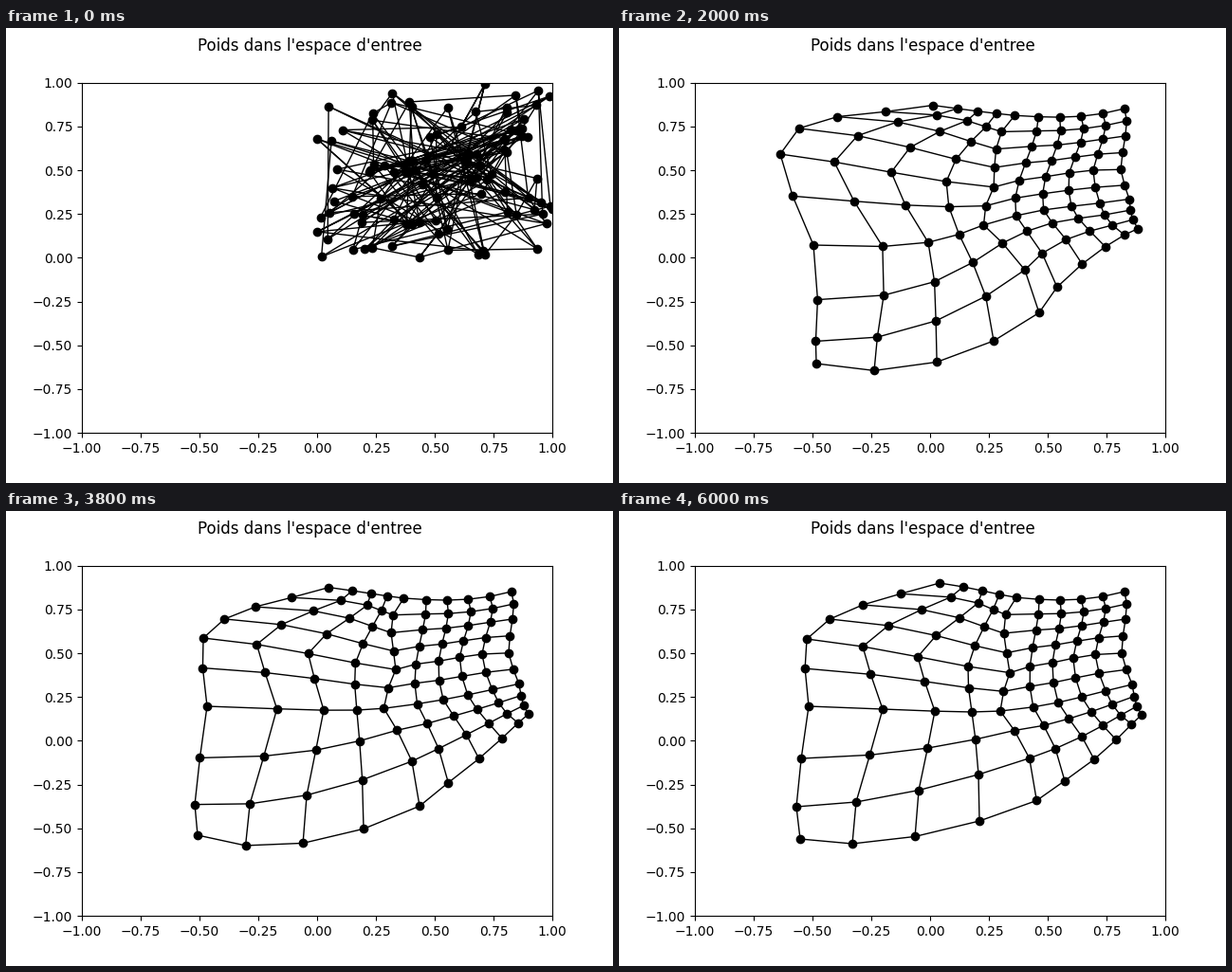
Recreate the animation shown at these times as a matplotlib script. Size 640 by 480 pixels, loop 6.2 s.

```python
import numpy as np
import matplotlib.pyplot as plt
from matplotlib.animation import FuncAnimation

N, FRAMES, STEP_MS = 10, 31, 200


def weights(nodes):
    """Local cubic interpolation from the given nodes to all N indices."""
    w = np.zeros((N, len(nodes)))
    for i in range(N):
        near = sorted(range(len(nodes)), key=lambda k: abs(nodes[k] - i - 0.1))[:4]
        for k in near:
            w[i, k] = np.prod([(i - nodes[j]) / (nodes[k] - nodes[j])
                               for j in near if j != k])
    return w


# Settled map: a few control nodes in pixels, y pointing down.
rows, cols = weights([0, 2, 4, 6, 8, 9]), weights([0, 1, 3, 6, 9])
settled = np.einsum("ri,ijk,cj->krc", rows, np.array([
    [(338, 76), (363, 80), (401, 88), (465, 94), (533, 85)],
    [(257, 99), (319, 104), (385, 122), (464, 124), (534, 114)],
    [(198, 135), (257, 143), (368, 164), (457, 160), (530, 150)],
    [(200, 206), (278, 209), (372, 212), (463, 202), (541, 183)],
    [(187, 312), (250, 307), (379, 278), (488, 238), (546, 206)],
    [(191, 346), (246, 351), (380, 327), (501, 262), (551, 215)]]), cols)

# The loose left and lower part is pulled at these (row, column) spots.
SPOTS = np.array([(1, 0), (4, 0), (6, 0), (9, 0), (6, 2), (9, 2), (8, 5)])
GRID = np.stack(np.indices((N, N)), -1).reshape(-1, 2)


def kernel(a, b, width=2.2):
    d2 = ((a[:, None] - b[None]) ** 2).sum(-1)
    return np.exp(-d2 / (2 * width ** 2))


SPREAD = kernel(GRID, SPOTS) @ np.linalg.inv(kernel(SPOTS, SPOTS))


def pulled(*pulls):
    return settled + (SPREAD @ np.array(pulls)).T.reshape(2, N, N)


KEYS = [
    (4, pulled((22, -10), (-17, 7), (-16, 54), (96, 17), (-31, 11), (69, -3), (-18, -29))),
    (10, pulled((-16, 1), (-28, -2), (5, 23), (17, 8), (-7, 15), (23, 9), (-14, -13))),
    (14, pulled((-8, 3), (0, 7), (-3, 7), (-2, -4), (-8, 2), (-9, 6), (-4, 5))),
    (19, pulled((4, 4), (10, -1), (12, 0), (11, -4), (2, -1), (1, 7), (-4, 0))),
    (26, pulled((7, 2), (12, 3), (15, 10), (-3, 6), (0, 2), (-21, 9), (2, 9))),
    (30, settled)]
MODES = np.cos(np.pi * np.outer(np.linspace(0, 1, N), range(3)))


def wobble(n):
    """Smooth random drift of the whole map."""
    amp = np.random.default_rng(n).normal(0, 1.5, (2, 3, 3))
    return MODES @ amp @ MODES.T


def to_data(p):
    return np.stack([(p[0] - 80) / 248 - 1, 1 - (p[1] - 57.6) / 184.8])


def net(n):
    if n == 0:
        return np.random.default_rng(5).uniform(0, 1, (2, N, N))
    first, early = KEYS[0]
    if n < first:
        centre = np.array([420, 175]).reshape(2, 1, 1)
        return to_data(centre + (early - centre) * (1 - 0.03 * (first - n) ** 2))
    for (a, p), (b, q) in zip(KEYS, KEYS[1:]):
        if n <= b:
            t = (n - a) / (b - a)
            return to_data(p + (q - p) * t + wobble(n) * np.sin(np.pi * t))


fig, ax = plt.subplots(figsize=(6.4, 4.8), dpi=100)
fig.suptitle("Poids dans l'espace d'entree", fontsize=12)
ax.set_xlim(-1, 1)
ax.set_ylim(-1, 1)
lines = [ax.plot([], [], "k-", lw=1)[0] for _ in range(2 * N)]
dots, = ax.plot([], [], "ko", ms=6)


def draw(n):
    x, y = net(n)
    for line, lx, ly in zip(lines, [*x, *x.T], [*y, *y.T]):
        line.set_data(lx, ly)
    dots.set_data(x.ravel(), y.ravel())
    return [*lines, dots]


anim = FuncAnimation(fig, draw, frames=FRAMES, interval=STEP_MS, repeat=True,
                     repeat_delay=0)
plt.show()
```
